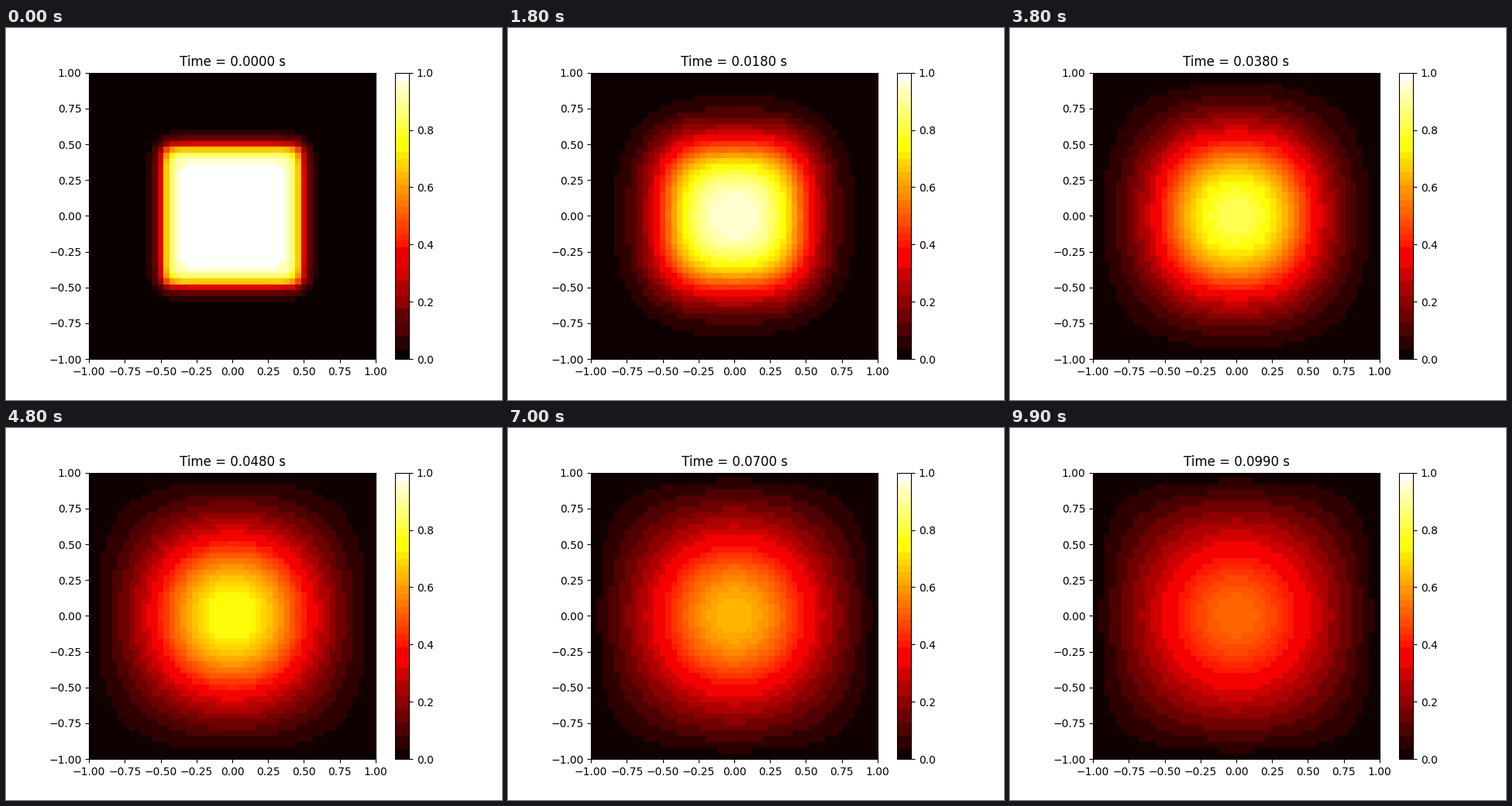
Animation of 640x480 px, one loop 10 s. Source, as a matplotlib script:

```python
import numpy as np
import matplotlib.pyplot as plt
from matplotlib.animation import FuncAnimation
from matplotlib.colors import ListedColormap

N = 50          # grid points per side
DT = 0.001      # time step, diffusivity is 1
FRAMES = 100

CELL_AREA = 7.392 ** 2              # pixels covered by one grid cell
BAR_AREA = 18.48 * 369.6 / 256      # pixels per colour of the colour bar
PAGE_AREA = 160000                  # white pixels around the plot


def solve_heat():
    """Backward Euler for the heat equation with cold edges."""
    x = np.linspace(-1, 1, N)
    s = DT / (x[1] - x[0]) ** 2
    lap = np.eye(N, k=1) + np.eye(N, k=-1) - 2 * np.eye(N)
    w, v = np.linalg.eigh(lap)
    denom = 1 - s * (w[:, None] + w[None, :])

    inside = (np.abs(x) < 0.5).astype(float)
    u = np.outer(inside, inside)
    states = [u]
    for _ in range(FRAMES + 1):
        u = v @ ((v.T @ u @ v) / denom) @ v.T
        u[[0, -1], :] = 0
        u[:, [0, -1]] = 0
        states.append(u)
    return states


# "hot" grouped into coarse colour bands
HOT = plt.get_cmap("hot")(np.arange(256), bytes=True)[:, :3].astype(int)
KEY = (HOT[:, 0] >> 5) * 128 + (HOT[:, 1] >> 4) * 8 + (HOT[:, 2] >> 5)
BAND = np.unique(KEY, return_inverse=True)[1].ravel()


def banded_cmap(u):
    """Each band takes the mean of its colours, weighted by area on screen."""
    level = np.clip((u * 256).astype(int), 0, 255).ravel()
    area = np.bincount(level, minlength=256) * CELL_AREA + BAR_AREA
    area[255] += PAGE_AREA
    total = np.bincount(BAND, area)
    mean = [np.bincount(BAND, area * HOT[:, c]) / total for c in range(3)]
    rgb = np.stack(mean, axis=1)[BAND] / 255
    return ListedColormap(np.clip(rgb, 0, 1))


states = solve_heat()

fig, ax = plt.subplots(figsize=(6.4, 4.8), dpi=100)
im = ax.imshow(states[2], extent=(-1, 1, -1, 1), origin="lower",
               cmap=banded_cmap(states[2]), vmin=0, vmax=1)
fig.colorbar(im, ax=ax)
title = ax.set_title("Time = 0.0000 s")


def update(i):
    u = states[i + 2]
    im.set_data(u)
    im.set_cmap(banded_cmap(u))
    title.set_text(f"Time = {i * DT:.4f} s")
    return im, title


anim = FuncAnimation(fig, update, frames=FRAMES, interval=100,
                     repeat=True, repeat_delay=0, blit=False)
plt.show()
```
